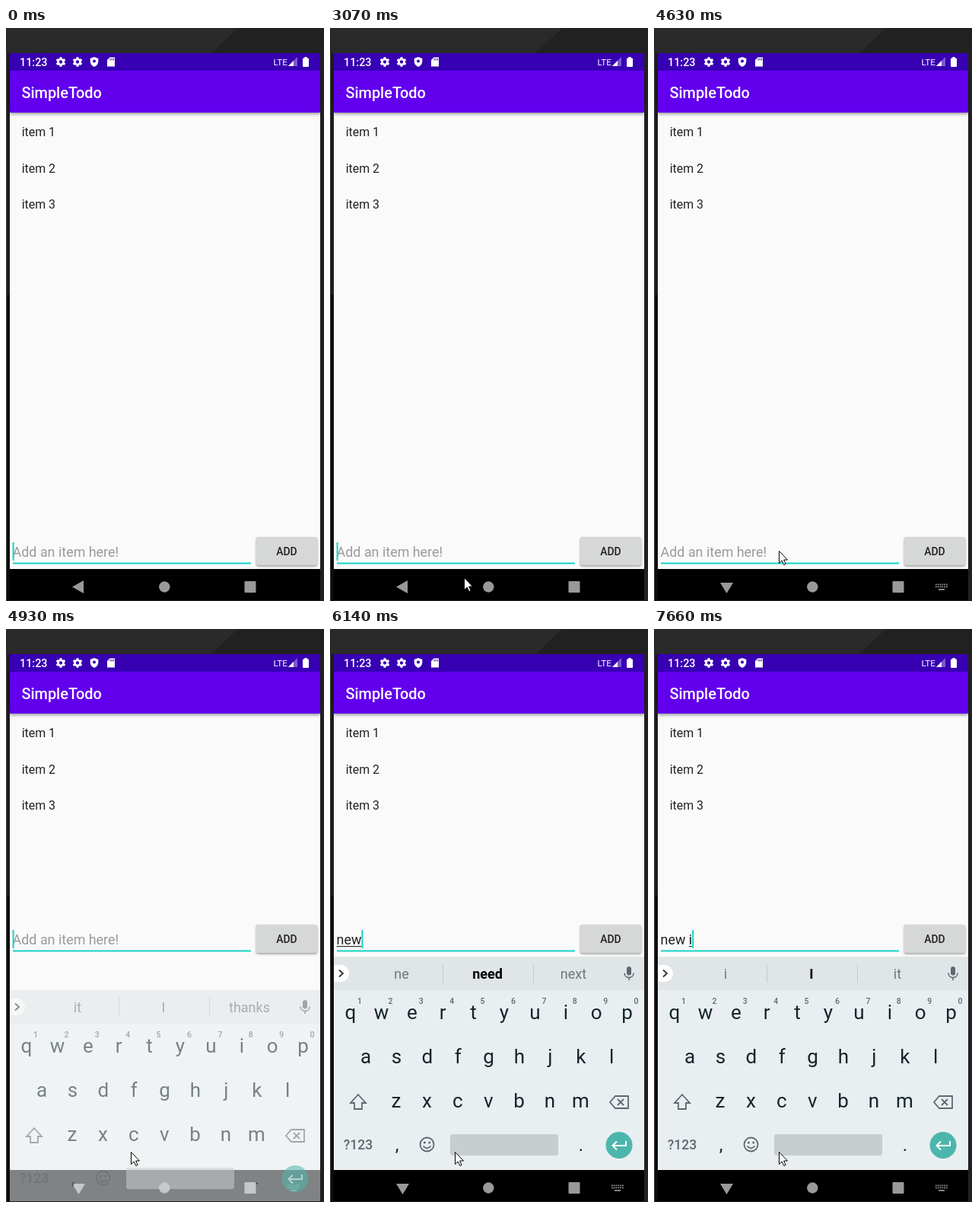
Recreate the animation shown at these times as an HTML page with a canvas. Size 418 by 752 pixels, loop 8 s.

```html
<!DOCTYPE html>
<html lang="en">
<head>
<meta charset="utf-8">
<title>Todo list</title>
<style>
html, body { margin: 0; overflow: hidden; background: #222; }
canvas { display: block; }
</style>
</head>
<body>
<canvas id="stage" width="418" height="752"></canvas>
<script>
const ctx = document.getElementById('stage').getContext('2d');
const LOOP = 8000, ROW_SHIFT = -280, KEY_STEP = 40.4;
const INK = '#15252b', GREY = '#5c6a70', TEAL = '#14d5c6';

const caretToggles = [360, 890, 1320, 1880, 2400, 2800, 3310, 3730, 4500, 4780, 5320, 5730, 6820, 7260];
const pointerSteps = [
  [2950, [181, 741]], [3070, [176, 721]], [3190, [171, 704]], [3310, [168, 692]], [3430, [167, 686]],
  [3580, [167, 678]], [3730, [167, 677]], [4130, [166, 681]], [4250, [164, 686]]
];
// Finished words and the word still being composed.
const typed = [[0, ['', '']], [5870, ['', 'n']], [5990, ['', 'ne']], [6140, ['', 'new']], [6270, ['new ', '']], [7660, ['new ', 'i']]];
const suggestions = [
  [0, ['it', 'I', 'thanks']], [6140, ['ne', 'need', 'next', true]], [6270, ['never', 'new', 'news', true]],
  [6430, ['year', 'one', 'for']], [7660, ['i', 'I', 'it', true]]
];
const at = (steps, t) => (steps.filter(([start]) => start <= t).pop() || [])[1];

function rect(x, y, w, h, color, radius = 0) {
  ctx.fillStyle = color;
  ctx.beginPath();
  ctx.roundRect(x, y, w, h, radius);
  ctx.fill();
}

function disc(x, y, r, color) {
  rect(x - r, y - r, 2 * r, 2 * r, color, r);
}

function text(str, x, y, size, color, weight = 400, align = 'left') {
  ctx.font = `${weight} ${size}px Roboto, sans-serif`;
  ctx.textAlign = align;
  ctx.fillStyle = color;
  ctx.fillText(str, x, y);
}

function shape(path, x, y, fill, stroke, width = 1) {
  ctx.save();
  ctx.translate(x, y);
  const p = new Path2D(path);
  if (fill) { ctx.fillStyle = fill; ctx.fill(p); }
  if (stroke) { ctx.strokeStyle = stroke; ctx.lineWidth = width; ctx.stroke(p); }
  ctx.restore();
}

function shadowed(blur, dy, color, draw) {
  ctx.save();
  ctx.shadowBlur = blur;
  ctx.shadowOffsetY = dy;
  ctx.shadowColor = color;
  draw();
  ctx.restore();
}

function gear(x, y) {
  ctx.strokeStyle = '#fff';
  ctx.lineWidth = 2.7;
  ctx.beginPath();
  ctx.arc(x, y, 3.5, 0, 7);
  ctx.stroke();
  for (let i = 0; i < 6; i++) {
    ctx.save();
    ctx.translate(x, y);
    ctx.rotate(i * Math.PI / 3);
    rect(-1.5, -6.3, 3, 2.6, '#fff');
    ctx.restore();
  }
}

function drawBody() {
  rect(0, 0, 418, 752, '#212121');
  shape('M0 0H305L270 33H0Z', 0, 0, '#2a2a2a');
  rect(0, 33, 5, 719, '#1b1b1b');
  rect(0, 33, 1, 719, '#454545');
  rect(1, 350, 4, 402, '#0c0c0c');
  rect(5, 33, 408, 718, '#fafafa');
}

function drawBars() {
  shadowed(4, 2, 'rgba(0,0,0,.4)', () => rect(5, 56, 408, 55, '#6200ee'));
  rect(0, 100, 5, 20, '#1b1b1b');
  rect(0, 100, 1, 20, '#454545');
  rect(413, 100, 5, 20, '#212121');
  rect(5, 33, 408, 23, '#3700b3');
  text('11:23', 18, 50, 14.4, '#fff', 500);
  gear(72, 44.5);
  gear(94, 44.5);
  shape('M0-6.5L5.3-4.5V-.5Q5 4.5 0 6.5Q-5 4.5-5.3-.5V-4.5Z', 116, 44.5, '#fff');
  disc(116, 43.5, 2, '#3700b3');
  shape('M-1.5-6H5V6H-5V-2.5Z', 138, 44.5, '#fff');
  for (const x of [136.5, 138.7, 140.9]) rect(x, 40, 1, 2.5, '#3700b3');
  text('LTE', 351.5, 49, 11.7, '#fff');
  shape('M371 50L383 38V50Z', 0, 0, 'rgba(255,255,255,.35)');
  shape('M371 50L378 43V50Z', 0, 0, '#fff');
  rect(390, 39.5, 8, 11.5, '#fff', 1);
  rect(392.3, 38, 3.4, 2, '#fff');
  text('SimpleTodo', 20.5, 92, 19.9, '#fff', 500);
}

function drawEntry(t, caretOn) {
  const [done, composing] = at(typed, t);
  ctx.save();
  if (t >= 4780) ctx.translate(0, ROW_SHIFT);
  if (done + composing) {
    text(done + composing, 8.6, 694, 17.9, '#202020');
    const start = 8.6 + ctx.measureText(done).width;
    rect(start, 696, ctx.measureText(composing).width, 1, '#202020');
  } else {
    text('Add an item here!', 8.6, 694, 17.9, t >= 3730 && t < 3850 ? '#747474' : '#9a9a9a');
  }
  if (caretOn) {
    rect(8.6 + ctx.measureText(done + composing).width * !!(done + composing), 675, 2, 24, TEAL);
  }
  rect(9, 701.5, 313, 2, TEAL);
  shadowed(3, 1.5, 'rgba(0,0,0,.4)', () => rect(329, 668, 80, 37, '#d6d7d7', 2));
  text('ADD', 369, 691.5, 13.9, '#202020', 500, 'center');
  ctx.restore();
}

function drawNav(keyboardOpen) {
  const color = '#999';
  rect(5, 710, 408, 41, '#000');
  disc(208.3, 733.5, 7.2, color);
  rect(313.5, 726, 15, 15, color, 1);
  if (!keyboardOpen) {
    shape('M87 733.5L102 725V742Z', 0, 0, color);
    return;
  }
  shape('M87 728H104L95.5 742Z', 0, 0, color);
  for (let i = 0; i < 12; i++) rect(370 + i % 6 * 2.8, 729.5 + Math.floor(i / 6) * 3, 1.7, 1.7, color);
  rect(374, 736, 8, 1.7, color);
}

function drawKeyboard(t) {
  const sliding = t < 5050;
  ctx.save();
  ctx.beginPath();
  ctx.rect(5, 430, 408, sliding ? 321 : 280);
  ctx.clip();
  if (sliding) {
    // The panel fades in as one layer, so each tone is blended equally.
    ctx.globalAlpha = .55;
    ctx.translate(0, 44);
  }
  rect(5, 430, 408, 44, '#e0e5e8');
  rect(5, 474, 408, 240, '#e9eef1');

  rect(-8, 441, 33, 22, '#fff', 11);
  shape('M12 447.5L17 452L12 456.5', 0, 0, null, '#333', 1.8);
  const [left, middle, right, bold] = at(suggestions, t);
  text(left, 94, 459, 18, '#6d787d', 400, 'center');
  text(middle, 207, 459, 18, bold ? '#000' : '#6d787d', bold ? 700 : 400, 'center');
  text(right, 320, 459, 18, '#6d787d', 400, 'center');
  for (const x of [148, 267]) rect(x, 440, 1, 24, '#c3c9cc');
  rect(390, 443, 6, 11.5, GREY, 3);
  shape('M387 451.5C387 459.5 399 459.5 399 451.5M393 457.5V461', 0, 0, null, GREY, 1.6);

  [['qwertyuiop', 27, 511.5], ['asdfghjkl', 47, 570], ['zxcvbnm', 87, 628]].forEach(([row, x, y]) =>
    [...row].forEach((key, i) => text(key, x + i * KEY_STEP, y, 26, INK, 400, 'center')));
  [...'1234567890'].forEach((digit, i) => text(digit, 39 + i * KEY_STEP, 492, 10.5, GREY, 500, 'center'));

  shape('M0-10L10 1H5V9H-5V1H-10Z', 37, 621, null, GREY, 1.8);
  shape('M-12 0L-5-8H12V8H-5ZM-2-4L6 4M6-4L-2 4', 380, 621, null, GREY, 1.8);
  text('?123', 37, 683, 17.5, GREY, 500, 'center');
  text(',', 88, 685, 24, INK, 400, 'center');
  text('.', 330, 685, 24, INK, 400, 'center');
  shape('M9 0A9 9 0 1 1-9 0A9 9 0 1 1 9 0M-5 2Q0 8 5 2', 127.5, 676.5, null, GREY, 1.8);
  disc(124.3, 674, 1.5, GREY);
  disc(130.7, 674, 1.5, GREY);
  rect(158, 663, 142, 28, '#c8cdd0', 3);
  disc(380, 677.5, 17.5, '#4db6ac');
  shape('M9-5V1H-8M-3-4.5L-8.5 1L-3 6.5', 380, 677, null, '#fff', 2);
  ctx.restore();
}

function render(t) {
  const caretOn = caretToggles.filter(time => time <= t).length % 2 === 0;
  drawBody();
  drawBars();
  for (let i = 0; i < 3; i++) text(`item ${i + 1}`, 20.7, 142 + i * 47.6, 15.9, '#212121');
  drawEntry(t, caretOn);
  drawNav(t >= 4630);
  if (t >= 4930) drawKeyboard(t);
  const pointer = at(pointerSteps, t);
  if (pointer) {
    shape('M.5.5V16.5L4.2 13L6.8 18.5L9.1 17.4L6.6 12H11.5Z', ...pointer, '#fff', '#000');
  }
}

function tick() {
  render(performance.now() % LOOP);
  requestAnimationFrame(tick);
}
tick();
</script>
</body>
</html>
```
